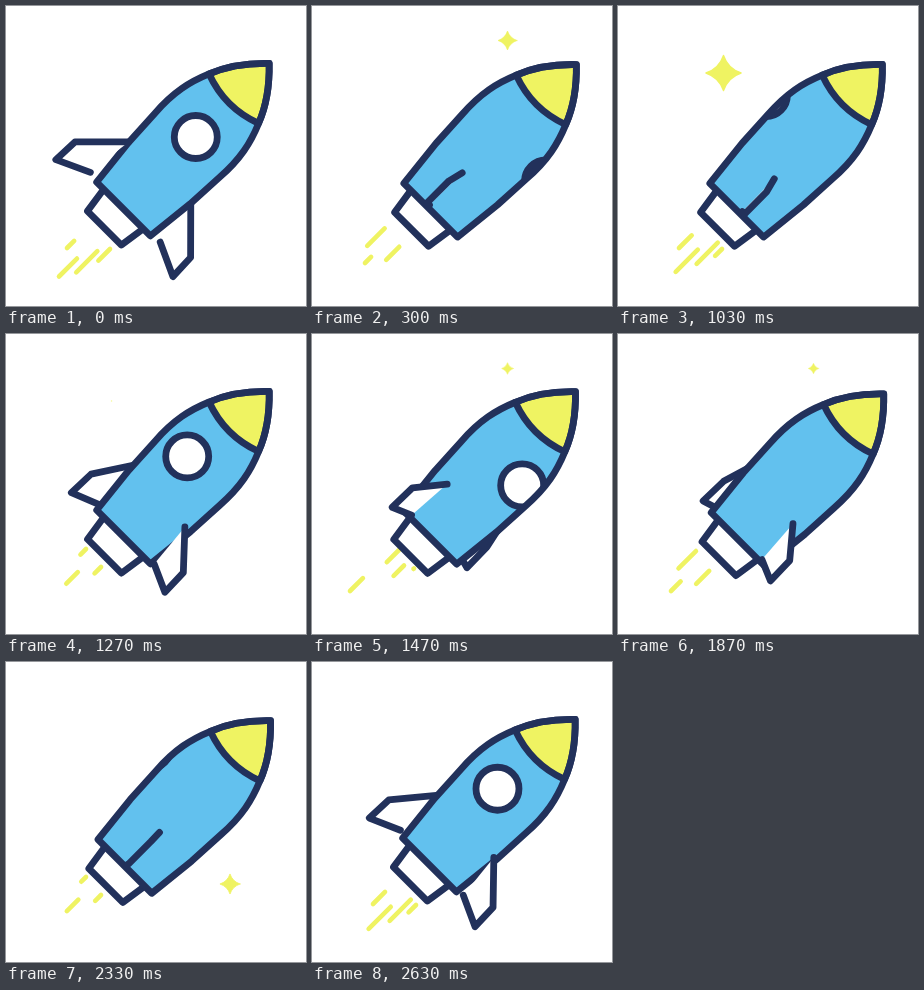
An HTML page with a canvas that plays this animation: 300x300 px, repeating every 2.66 s.

```html
<!DOCTYPE html>
<html lang="en">
<head>
<meta charset="utf-8">
<title>Spinning rocket</title>
<style>
  html, body { margin: 0; width: 100%; height: 100%; overflow: hidden; background: #fff; }
  canvas { display: block; width: 300px; height: 300px; }
</style>
</head>
<body>
<canvas id="stage" width="300" height="300"></canvas>
<script>
const ctx = document.getElementById('stage').getContext('2d');
const NAVY = '#22315b', BLUE = '#62c1ee', YELLOW = '#eff362', WHITE = '#fff';
const LOOP = 2660, TURN = LOOP / 2, DASH_CYCLE = LOOP / 5, TWINKLE = LOOP / 4;

// Rocket space: x runs from base to nose, y runs across the body.
const body = new Path2D(
  'M0-38L51-43.5L90-45.5C118-47.5 137-43 156-35Q182-25 206 0' +
  'Q182 25 156 35C137 43 118 47.5 90 45.5L51 43.5L0 38Z');
const nose = new Path2D('M156-35Q182-25 206 0Q182 25 156 35Q143 0 156-35Z');
const nozzle = new Path2D('M0-28L-27-24L-27 24L0 28');
const star = new Path2D('M1 0Q.25.25 0 1Q-.25.25-1 0Q-.25-.25 0-1Q.25-.25 1 0Z');

// Fin corners seen from the side, head on, and from behind.
const finSide = [[51, 44], [13, 82], [-13, 83], [2.5, 49.5]];
const finFront = [[48.5, 0], [36, 0], [5, 0], [3, 0]];
const finBack = [[110, 30], [61, 0], [29, 0], [20, 0]];

// Exhaust: x + y of the lane, first x, last x, start, travel time
const dashes = [
  [303, 87, 61, 332, 160], [323.5, 92, 53, 367, 150], [336.5, 102, 66, 405, 145],
  [347, 104, 76, 450, 200], [310, 78, 53, 76, 185], [295, 80, 38, 180, 205],
  [328, 95, 71, 165, 157]
];
const DASH_DELAY = 85;

// Stars: x, y, radius, start
const stars = [
  [195.5, 34.5, 9.5, 0], [195.5, 34.5, 9.5, TURN],
  [105.5, 67, 19, 615], [224, 222, 10.2, 1960]
];

const mod = (n, m) => ((n % m) + m) % m;
const clamp = n => Math.min(1, Math.max(0, n));

function paint(path, fill, stroke = NAVY) {
  if (fill) { ctx.fillStyle = fill; ctx.fill(path); }
  ctx.strokeStyle = stroke;
  ctx.stroke(path);
}

function drawDashes(time) {
  ctx.lineWidth = 4.6;
  for (const [lane, from, to, start, travel] of dashes) {
    const age = mod(time - start, DASH_CYCLE);
    const head = clamp(age / travel), tail = clamp((age - DASH_DELAY) / travel);
    if (tail >= 1) continue;
    const x1 = from + (to - from) * head, x2 = from + (to - from) * tail;
    const line = new Path2D();
    line.moveTo(x1, lane - x1);
    line.lineTo(x2, lane - x2);
    paint(line, null, YELLOW);
  }
}

function drawStars(time) {
  for (const [x, y, radius, start] of stars) {
    const age = (time - start) / TWINKLE;
    if (age <= 0 || age >= 1) continue;
    const size = radius * Math.sin(Math.PI * age);
    ctx.save();
    ctx.translate(x, y);
    ctx.scale(size, size);
    ctx.lineWidth = 0.08;
    paint(star, YELLOW, YELLOW);
    ctx.restore();
  }
}

// quarter: 0 left, 1 front, 2 right, 3 back
function drawFin(quarter) {
  const reach = Math.abs(1 - mod(quarter, 2));
  const side = quarter < 1 || quarter > 3 ? -1 : 1;
  const inner = quarter < 2 ? finFront : finBack;
  const path = new Path2D();
  finSide.forEach(([x, y], i) => {
    const [x0, y0] = inner[i];
    path.lineTo(x0 + (x - x0) * reach, side * (y0 + (y - y0) * reach));
  });
  paint(path, WHITE);
}

function drawWindow(turn) {
  const offset = mod(turn + 0.5, 1) - 0.5;
  if (Math.abs(offset) > 0.25) return;
  const port = new Path2D();
  port.arc(102, offset * 270, 21.5, 0, 7);
  ctx.save();
  ctx.clip(body);
  paint(port, WHITE);
  ctx.restore();
}

function drawRocket(time) {
  const turn = mod(time / TURN, 1);
  const sway = 1.4 * (1 - Math.cos(2 * Math.PI * turn));
  const fins = [turn * 4, mod(turn * 4 + 2, 4)];
  ctx.save();
  ctx.translate(117.5 + sway, 203 + sway);
  ctx.rotate(-Math.PI / 4);
  ctx.lineWidth = 6.8;
  fins.filter(q => q >= 2).forEach(drawFin);
  paint(nozzle, WHITE);
  ctx.fillStyle = BLUE;
  ctx.fill(body);
  drawWindow(turn);
  paint(nose, YELLOW);
  paint(body);
  fins.filter(q => q < 2).forEach(drawFin);
  ctx.restore();
}

function frame() {
  const time = performance.now() % LOOP;
  ctx.clearRect(0, 0, 300, 300);
  ctx.lineCap = ctx.lineJoin = 'round';
  drawDashes(time);
  drawStars(time);
  drawRocket(time);
  requestAnimationFrame(frame);
}
frame();
</script>
</body>
</html>
```
